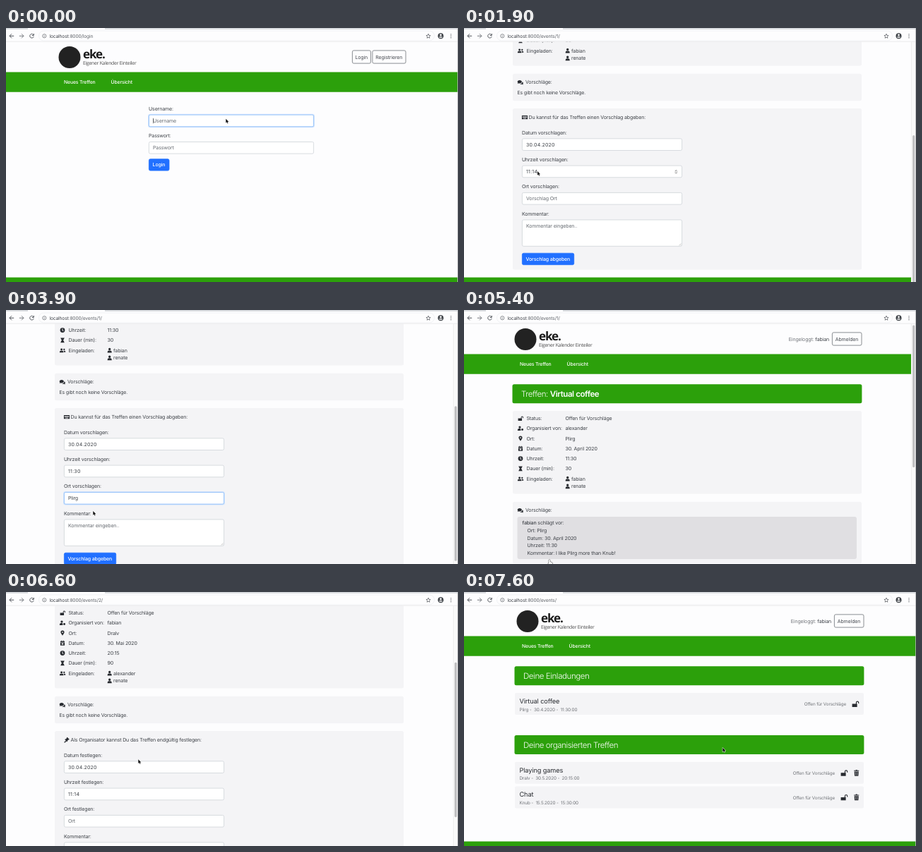
These frames come from a looping animation (640x360 px, 7700 ms). An HTML page with a canvas:

```html
<!DOCTYPE html>
<html lang="de">
<head>
<meta charset="utf-8">
<title>Treffen planen</title>
<style>
html, body { margin: 0; width: 100%; height: 100%; overflow: hidden; background: #fdfdfe }
canvas { display: block; width: 640px; height: 360px }
</style>
</head>
<body>
<canvas id="stage"></canvas>
<script>
const LOOP = 7700, STEP = 100, TOP = 19.5, VIEW = 353;
const INK = '#282b30', BODY = '#3d4147', GREY = '#72757a', GREEN = '#2ca00b', BLUE = '#2170ff', CARD = '#f4f4f6', PAPER = '#fdfdfe';
const cv = document.getElementById('stage'), c = cv.getContext('2d');
const dpr = window.devicePixelRatio || 1;
cv.width = 640 * dpr;
cv.height = 360 * dpr;

const ME = 'fabian', GUEST = 'renate', HOST = 'alexander';
const COMMENT = 'I like Plirg more than Knub!';

// Icons on a ten unit box around 0,0
const ICON = {
  lock: 'M-5 0h6v-2a2.5 2.5 0 0 1 5 0v1.5h-1.3v-1.5a1.2 1.2 0 0 0-2.4 0v2h.7v5h-8z',
  trash: 'M-4-4h2.5l.5-1h2l.5 1H4v1.2h-8zM-3.5-2h7l-.5 7h-6zM-1.6-.8v4.6h.6v-4.6zM1-.8v4.6h.6v-4.6z',
  user: 'M0-5a2.5 2.5 0 0 1 0 5a2.5 2.5 0 0 1 0-5zM-4.4 5v-1.5a3 3 0 0 1 3-3h2.8a3 3 0 0 1 3 3v1.5z',
  host: 'M-1.5-5a2.4 2.4 0 0 1 0 4.8a2.4 2.4 0 0 1 0-4.8zM-6 4.5v-1.2a3 3 0 0 1 3-3h2.5l1 1.5v2.7zM3.8.3a2.2 2.2 0 0 1 0 4.4a2.2 2.2 0 0 1 0-4.4z',
  pin: 'M0 5.5C-1.5 2.5-3.8.8-3.8-1.5a3.8 3.8 0 0 1 7.6 0C3.8.8 1.5 2.5 0 5.5zM0-2.9a1.4 1.4 0 0 0 0 2.8a1.4 1.4 0 0 0 0-2.8z',
  date: 'M-4.5-4h2v-1.2h1.3V-4h2.4v-1.2h1.3V-4h2v2h-9zM-4.5-1.2h9v6.2h-9zM-1.8.4v2.8h3.6v-2.8z',
  clock: 'M0-5a5 5 0 0 1 0 10a5 5 0 0 1 0-10zM-.7-3v3.6l2.2 1.8l.8-1l-1.6-1.3V-3z',
  glass: 'M-4-5h8v1.2h-.8c0 2-1 3-2.2 3.8c1.2.8 2.2 1.8 2.2 3.8H4V5h-8V3.8h.8c0-2 1-3 2.2-3.8c-1.2-.8-2.2-1.8-2.2-3.8H-4z',
  users: 'M-2-4a2.2 2.2 0 0 1 0 4.4a2.2 2.2 0 0 1 0-4.4zM-6 4.5v-1a2.5 2.5 0 0 1 2.5-2.5h3a2.5 2.5 0 0 1 2.5 2.5v1zM3.4-3.5a1.7 1.7 0 0 1 0 3.4a1.7 1.7 0 0 1 0-3.4zM2.2.8h2a2 2 0 0 1 2 2v1h-3.3q0-2-.7-3z',
  talk: 'M-1.5-4c2.8 0 4.5 1.4 4.5 3.2s-1.7 3.2-4.5 3.2q-1.2 0-2-.4q-1 .9-2.5.9q1-1 1-1.8q-1-.8-1-1.9c0-1.8 1.7-3.2 4.5-3.2zM4-.8q2 .8 2 2.4q0 1-.8 1.8q0 .9.8 1.6q-1.5 0-2.4-.8q-2.4.8-4.2-.6q4.4-.4 4.6-4.4z',
  keys: 'M-6-3.5H6v7.5h-12zM-4.8-2.2h9.6v.9h-9.6zM-4.8-.2h9.6v.9h-9.6zM-3 2h6v.8h-6z',
  gavel: 'M1-5.5l4.5 4.5l-1.2 1.2l-.7-.4l-2.3 2.3l.4.7l-1.2 1.2l-4.5-4.5l1.2-1.2l.7.4l2.3-2.3l-.4-.7zM-1.9 2l1.2 1.2l-3.6 3l-1.4-1.4z'
};
const ARROW = new Path2D('M0 0v5.8l1.3-1.2l.9 2l1-.4l-.9-2h1.8z');
const HAND = new Path2D('M-.8.6a.8.8 0 0 1 1.6 0v2.4l2.6.7q.8.3.7 1.2l-.5 3h-3.6l-2-2.8q.4-1 1.2-.3z');
for (const k in ICON) ICON[k] = new Path2D(ICON[k]);

// Text with y at the middle of its capitals; returns the right end
function text(s, x, y, { size = 7.03, color = BODY, weight = 400, align = 'left', gap = -.02, face = 'Inter' } = {}) {
  c.font = `${weight} ${size}px ${face}, sans-serif`;
  c.letterSpacing = gap * size + 'px';
  c.textRendering = 'geometricPrecision';
  c.textAlign = align;
  c.fillStyle = color;
  c.fillText(s, x, y + size * .36);
  return x + c.measureText(s).width;
}
function box(x, y, w, h, fill, r = 0, line) {
  c.beginPath();
  c.roundRect(x, y, w, h, r);
  if (fill) { c.fillStyle = fill; c.fill(); }
  if (line) { c.strokeStyle = line; c.lineWidth = .8; c.stroke(); }
}
function disc(x, y, r, fill) {
  c.beginPath();
  c.arc(x, y, r, 0, 7);
  c.fillStyle = fill;
  c.fill();
}
function icon(name, x, y, k = .68) {
  c.save();
  c.translate(x, y);
  c.scale(k, k);
  c.fillStyle = INK;
  c.fill(ICON[name], 'evenodd');
  c.restore();
}
function stroke(d, x, y, color = '#50545a', w = 1) {
  c.save();
  c.translate(x, y);
  c.strokeStyle = color;
  c.lineWidth = w;
  c.stroke(new Path2D(d));
  c.restore();
}
function field(x, y, w, h, value, hint, focus, gap) {
  if (focus) box(x - 1, y - 1, w + 2, h + 2, '#d5e6fd', 3);
  box(x + .4, y + .4, w - .8, h - .8, '#fff', 2, focus ? '#80b7f8' : '#cfd3d8');
  const ty = y + 8.7;
  return value ? text(value, x + 6, ty, { gap }) : (text(hint, x + 6, ty, { color: '#666b71' }), x + 6);
}
function button(x, y, w, h, label, solid) {
  box(x + .4, y + .4, w - .4, h - .8, solid ? BLUE : null, 2, solid ? BLUE : '#6d7177');
  text(label, x + w / 2, y + h / 2, { align: 'center', color: solid ? '#fff' : '#484c52', weight: solid ? 500 : 400 });
}

// Eased value from [time, ...values] keys
function at(keys, t) {
  let i = keys.findIndex(k => k[0] > t);
  if (i < 0) i = keys.length;
  const a = keys[i - 1], b = keys[i] || a;
  const p = b === a ? 0 : (t - a[0]) / (b[0] - a[0]), e = p * p * (3 - 2 * p);
  return a.slice(1).map((v, n) => v + (b[n + 1] - v) * e);
}
const typed = (s, t, from, to) => s.slice(0, Math.max(0, Math.ceil(s.length * Math.min(1, (t - from) / (to - from)))));

const MOUSE = [[0, 311.3, 128.7], [400, 311.3, 128.7], [700, 216, 192], [900, 216, 192], [1100, 112, 153], [1600, 112, 153],
  [1900, 104, 203], [2400, 104, 226], [3200, 104, 226], [3400, 122, 264], [3700, 122, 264], [3900, 123.3, 285],
  [4000, 123, 302], [4500, 123, 302], [4800, 121, 352], [5000, 121, 354], [5400, 121, 354], [5700, 158, 74],
  [5800, 158, 74], [6100, 110, 251], [6300, 110, 251], [6600, 187.3, 237.2], [6800, 187.3, 237.2], [7200, 158, 74],
  [7500, 158, 74], [7600, 366.3, 220.7]];
const HANDS = [[700, 900], [1100, 1600], [4800, 5500], [5700, 5800], [6100, 6300], [7200, 7500]];
const SCROLL = [[0, 0], [1600, 0], [1900, 207], [2100, 207], [2400, 182], [4800, 182], [4801, 0], [6400, 0],
  [6600, 124], [6800, 124], [7100, 0]];

function browser(url, key, loading) {
  box(0, 0, 640, TOP, PAPER);
  box(0, 0, 31, 2, '#d8dade');
  box(140, 0, 500, 2, '#d8dade');
  box(0, TOP - .7, 640, .7, '#e3e3e6');
  box(46.5, 4, 560, 14, null, 7, '#eeeff2');
  stroke('M3.2 0H-3M0-3L-3 0L0 3', 8, 11.3);
  stroke('M-3.2 0H3M0-3L3 0L0 3', 22, 11.3, '#777b80');
  stroke(loading ? 'M-2.5-2.5L2.5 2.5M2.5-2.5L-2.5 2.5' : 'M2.2-1.8A2.8 2.8 0 1 0 2.7.8M2.8-3.3v2.5h-2.5', 36.5, 11.3);
  stroke('M0-2.6a2.6 2.6 0 0 1 0 5.2a2.6 2.6 0 0 1 0-5.2zM0-.4v1.7M0-1.5v.6', 54.3, 11.3, '#5f6368', .7);
  const end = text('localhost', 61.5, 11.3, { size: 6.63 });
  text(':8000' + url, end, 11.3, { size: 6.63, color: '#5f6368' });
  if (key) {
    disc(581.5, 11.3, 1.8, '#4b4f54');
    disc(581.3, 11.3, .6, PAPER);
    box(583, 10.8, 3.8, 1.1, '#4b4f54');
    box(585, 11.3, 1.1, 1.6, '#4b4f54');
  }
  stroke('M0-3l.9 2.1l2.2.2l-1.7 1.5l.5 2.2l-1.9-1.2l-1.9 1.2l.5-2.2l-1.7-1.5l2.2-.2z', 598, 11.3, '#5f6368', .8);
  disc(615.5, 11.3, 4, '#3e4247');
  disc(615.5, 10, 1.4, PAPER);
  box(613.2, 12.2, 4.6, 1.6, PAPER, .8);
  for (const d of [-2.4, 0, 2.4]) disc(630, 11.3 + d, .7, '#5f6368');
}

function header(dx, width, loggedIn) {
  disc(90 + dx, 41.5, 15.5, '#222');
  text('eke.', 109 + dx, 37, { size: 17, weight: 700, gap: -.065, color: '#1b1b1b', face: 'Open Sans' });
  text('Eigener Kalender Einteiler', 109 + dx, 49.3, { size: 6.8, gap: -.035, color: '#4a4a4a', face: 'Open Sans' });
  if (loggedIn) {
    text(ME, 520 + dx, 41, { align: 'right' });
    const w = c.measureText(' ' + ME).width;
    text('Eingeloggt:', 520 + dx - w, 41, { align: 'right', color: GREY });
    button(524 + dx, 31.5, 42, 19, 'Abmelden');
  } else {
    button(490, 31.5, 26.5, 19, 'Login');
    button(518.5, 31.5, 47.5, 19, 'Registrieren');
  }
  box(0, 62.5, width, 28.3, GREEN);
  text('Neues Treffen', 82 + dx, 76.8, { color: '#fff', weight: 500, size: 6.85 });
  text('Übersicht', 148.5 + dx, 76.8, { color: '#fff', weight: 500, size: 6.85 });
}

function title(x, y, light, bold = '') {
  box(x - .5, y, 494.9, 27, GREEN, 2.5);
  const o = { size: 11.5, color: '#fff', gap: -.036 };
  const end = text(light, x + 12, y + 14, { ...o, weight: 300 });
  text(bold, end, y + 14, { ...o, weight: 600 });
}

function login(t) {
  header(0, 640, false);
  const onPass = t >= 400;
  const name = typed(ME, t, 0, 300), pass = typed('••••••••', t, 400, 600);
  text('Username:', 202, 114.2);
  const a = field(202, 122.7, 234, 17.5, name, 'Username', !onPass);
  text('Passwort:', 202, 152.6);
  const b = field(202, 161, 234, 17.5, pass, 'Passwort', onPass);
  box(onPass ? b : a, onPass ? 166 : 127.7, .6, 7.5, INK);
  button(202, 185.3, 29, 17.2, 'Login', true);
  box(0, 353.5, 640, 7, GREEN);
}

function meeting(y, name, meta, own, mouse) {
  const hot = mouse[1] > y && mouse[1] < y + 31 && mouse[0] > 72 && mouse[0] < 566;
  box(72, y, 494, 31, hot ? '#ebebed' : CARD, 2);
  text(name, 78.5, y + 11.5, { size: 9.2, gap: -.012, color: INK });
  text(meta, 78.5, y + 23.3, { size: 6.35, color: GREY });
  text('Offen für Vorschläge', own ? 525 : 541, y + 16, { size: 6.3, color: GREY, align: 'right' });
  icon('lock', own ? 538 : 554, y + 15.5, .88);
  if (own) icon('trash', 555.7, y + 15.5, .88);
}

function list(mouse) {
  header(0, 640, true);
  title(72, 105.2, 'Deine Einladungen');
  meeting(143, 'Virtual coffee', 'Plirg -  30.4.2020 -  11:30:00', false, mouse);
  title(72, 202.9, 'Deine organisierten Treffen');
  meeting(240.8, 'Playing games', 'Dralv -  30.5.2020 -  20:15:00', true, mouse);
  meeting(275.4, 'Chat', 'Knub -  15.5.2020 -  15:30:00', true, mouse);
  box(0, 353.5, 640, 7, GREEN);
}

function proposal() {
  box(75.5, 293, 480.5, 60, '#e0dfe2', 3);
  const end = text(ME, 82.5, 301.5, { weight: 500 });
  text(' schlägt vor:', end, 301.5);
  ['Ort: Plirg', 'Datum: 30. April 2020', 'Uhrzeit: 11:30', 'Kommentar: ' + COMMENT]
    .forEach((s, i) => text(s, 89.5, 312.4 + i * 10.65));
}

function details(e, t) {
  header(-3, 633, true);
  title(69, 105.2, 'Treffen: ', e.name);
  box(69, 143, 494, 117.5, CARD, 2.5);
  [['lock', 'Status:', 'Offen für Vorschläge'], ['host', 'Organisiert von:', e.host], ['pin', 'Ort:', e.place],
    ['date', 'Datum:', e.date], ['clock', 'Uhrzeit:', e.time], ['glass', 'Dauer (min):', e.length], ['users', 'Eingeladen:', '']]
    .forEach(([sign, label, value], i) => {
      const y = 153.6 + i * 14.25;
      icon(sign, 80, y);
      text(label, 88.5, y);
      text(value, 143.5, y);
    });
  e.guests.forEach((g, i) => {
    icon('user', 146.7, 239.1 + i * 10.8);
    text(g, 152, 239.1 + i * 10.8);
  });
  const more = e.sent ? 49 : 0;
  box(69, 271.8, 494, 38.4 + more, CARD, 2.5);
  icon('talk', 79.8, 283.8);
  text('Vorschläge:', 87, 283.8);
  if (e.sent) proposal();
  else text('Es gibt noch keine Vorschläge.', 75.5, 298.2, { size: 6.95 });

  c.save();
  c.translate(0, more);
  box(69, 321, 494, 228.5, CARD, 2.5);
  icon(e.sign, 86, 333.5);
  text(e.intro, 91.5, 333.5);
  const labels = ['Datum ', 'Uhrzeit ', 'Ort '].map(s => s + e.verb + ':');
  const hints = ['', '', e.hint];
  e.values.forEach((v, i) => {
    const y = 355 + i * 38.3;
    text(labels[i], 82, y);
    field(82, y + 8.4, 227, 17.5, v, hints[i], e.focus === i, i < 2 ? .03 : undefined);
  });
  if (e.spin) {
    box(298, 407.5, 4.6, 6.6, '#efefef', 1.5);
    stroke('M-1.2-.8L0-2L1.2-.8M-1.2.8L0 2L1.2.8', 300.3, 410.8, '#555', .7);
  }
  text('Kommentar:', 82, 470);
  field(82, 478.5, 227, 38.2, e.comment, 'Kommentar eingeben..', e.focus === 3);
  stroke('M0 3L3 0M1.8 3L3 1.8', 304.5, 512.3, '#999', .5);
  button(82, 525.8, 73.7, 17.2, e.action, true);
  box(0, 560.5, 633, 19, GREEN);
  c.restore();
  return 207 + more;
}

function coffee(t) {
  const sent = t >= 4900;
  return {
    name: 'Virtual coffee', host: HOST, place: 'Plirg', date: '30. April 2020', time: '11:30', length: '30',
    guests: [ME, GUEST], sent, sign: 'keys', intro: 'Du kannst für das Treffen einen Vorschlag abgeben:',
    verb: 'vorschlagen', hint: 'Vorschlag Ort', action: 'Vorschlag abgeben',
    values: ['30.04.2020', t < 2800 || sent ? '11:14' : t < 2900 ? '11:03' : '11:30', sent ? '' : typed('Plirg', t, 3300, 3800)],
    comment: sent ? '' : typed(COMMENT, t, 4000, 4600),
    focus: t < 2500 || sent ? -1 : t < 3300 ? 1 : t < 4000 ? 2 : 3,
    spin: t >= 1900 && t < 3300
  };
}
const GAMES = {
  name: 'Playing games', host: ME, place: 'Dralv', date: '30. Mai 2020', time: '20:15', length: '90',
  guests: [HOST, GUEST], sign: 'gavel', intro: 'Als Organisator kannst Du das Treffen endgültig festlegen:',
  verb: 'festlegen', hint: 'Ort', action: 'Treffen festlegen', values: ['30.04.2020', '11:14', ''], comment: '', focus: -1
};

function draw(t) {
  const mouse = at(MOUSE, t);
  c.setTransform(dpr, 0, 0, dpr, 0, 0);
  box(0, 0, 640, 360, PAPER);
  let url = '/events/';
  if (t < 900) { url = '/login'; login(t); }
  else if (t < 1400) { url = ''; list(mouse); }
  else if ((t >= 5800 && t < 6300) || t >= 7300) list(mouse);
  else {
    const [y] = at(SCROLL, t), first = t < 5800;
    url += first ? '1/' : '2/';
    c.save();
    c.translate(0, -y);
    const max = details(first ? coffee(t) : GAMES, t);
    c.restore();
    // The window reaches a little below the stage
    const k = VIEW / (VIEW + max);
    box(633, TOP, 7, VIEW, '#fafafa');
    box(633, TOP, .6, VIEW, '#e6e6e6');
    box(635.1, TOP + 2 + y * k, 3.2, VIEW * k - 3, '#bfbfc1', 1.6);
  }
  browser(url, t >= 500 && t < 1400, t === 800);
  box(639.2, 0, .8, 360, '#b4b4b8');
  c.save();
  c.translate(...mouse);
  const hand = HANDS.some(([a, b]) => t >= a && t <= b);
  const shape = hand ? HAND : ARROW;
  c.lineWidth = hand ? .9 : 1;
  c.strokeStyle = hand ? '#222' : '#fff';
  c.fillStyle = hand ? '#fff' : '#111';
  c.stroke(shape);
  c.fill(shape);
  c.restore();
}

const start = performance.now();
function tick() {
  const t = (performance.now() - start) % LOOP;
  draw(Math.floor(t / STEP) * STEP);
  requestAnimationFrame(tick);
}
tick();
</script>
</body>
</html>
```
